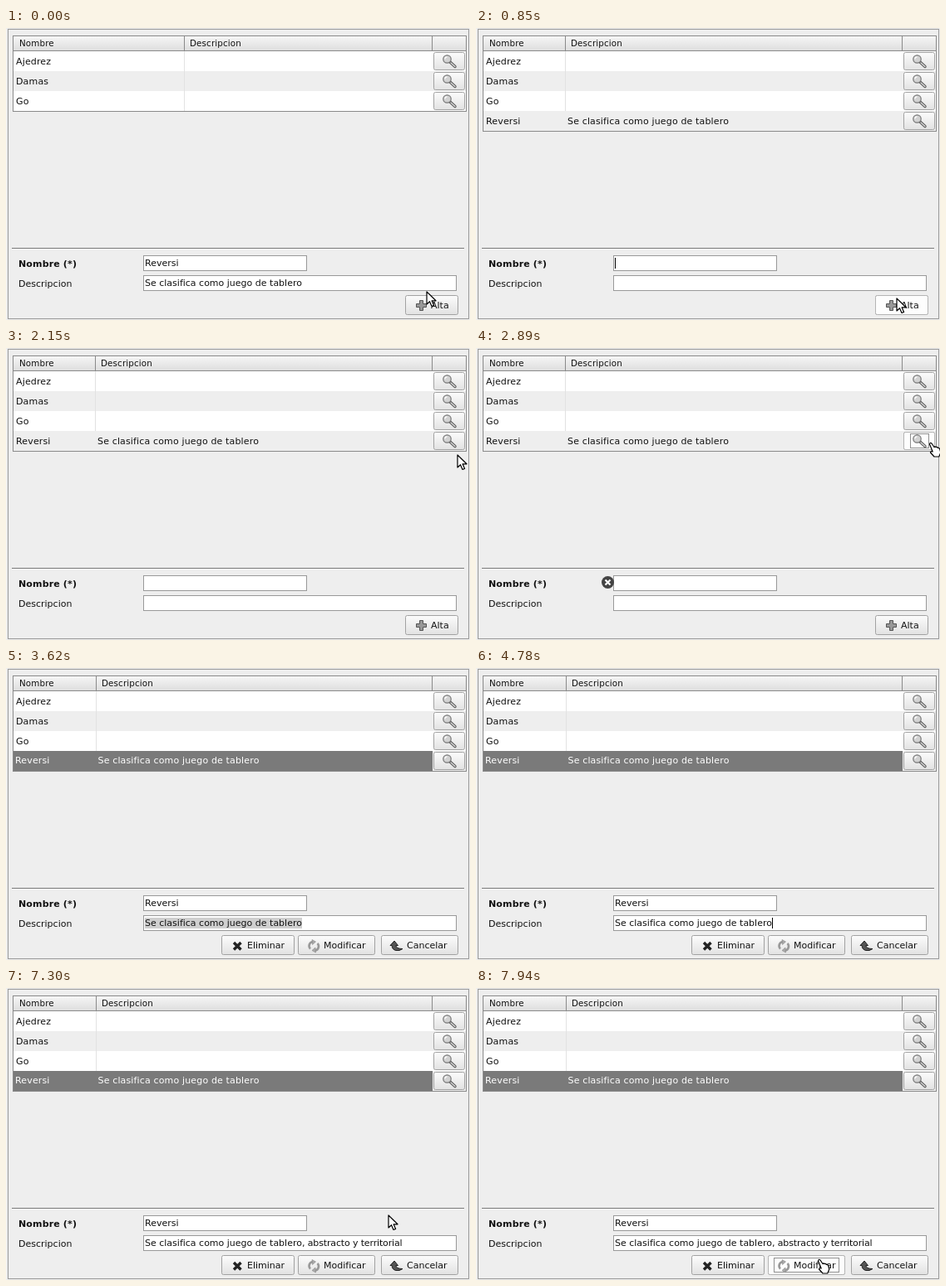
Write an HTML page that moves like this. It is 558 by 352 pixels and loops after 8000 ms.

```html
<!DOCTYPE html>
<html lang="es">
<head>
<meta charset="utf-8">
<title>Juegos</title>
<style>
html, body { margin: 0; width: 100%; height: 100%; overflow: hidden; background: #eee; }
svg { display: block; width: 558px; height: 352px; }
text { font: 11px "DejaVu Sans", sans-serif; fill: #111; }
.head text { font-size: 10.3px; letter-spacing: .15px; }
.cell text { letter-spacing: .15px; }
.picked text { fill: #fff; }
.bold { font-weight: bold; letter-spacing: .15px; }
.tail { letter-spacing: -.14px; }
.line { fill: none; stroke: #8a8a8a; }
.soft { stroke: #e2e2e2; }
.field { fill: #fff; stroke: #999; }
.btn { fill: url(#face); stroke: #a2a2a2; }
.hot { fill: #fdfdfd; stroke: #b4b4b4; }
.focus { fill: none; stroke: #222; stroke-dasharray: 1 1; }
.caret { fill: #000; }
.ptr { fill: #fff; stroke: #000; stroke-width: 1.2; stroke-linejoin: round; }
</style>
</head>
<body>
<!-- data-on lists the spans of time, in ms, in which a part is visible -->
<svg viewBox="0 0 558 352">
  <defs>
    <linearGradient id="face" x2="0" y2="1">
      <stop stop-color="#fcfcfc"/><stop offset="1" stop-color="#e2e2e2"/>
    </linearGradient>
    <linearGradient id="bar" x2="0" y2="1">
      <stop stop-color="#f6f6f6"/><stop offset="1" stop-color="#dedede"/>
    </linearGradient>
    <g id="glass">
      <path d="M534 41L540 46.500" stroke="#555" stroke-width="3.400" stroke-linecap="round"/>
      <path d="M535 42L540 46.500" stroke="#ddd" stroke-width="1.400" stroke-linecap="round"/>
      <circle cx="530.500" cy="37.500" r="4.700" fill="#d2d2d2" stroke="#777" stroke-width="1.200"/>
      <path d="M527.800 37.500a2.800 2.800 0 0 1 2.700-2.700" fill="none" stroke="#fff" stroke-width="1.200"/>
    </g>
    <g id="lens">
      <rect class="btn" x="514.500" y="29.500" width="37" height="21" rx="2"/>
      <use href="#glass"/>
    </g>
  </defs>

  <rect width="558" height="352" fill="#eee"/>
  <rect class="line" x="2.500" y="1.500" width="554" height="349" style="stroke:#999"/>

  <g class="cell">
    <rect x="9" y="28" width="544" height="72" fill="#fff"/>
    <rect x="9" y="52" width="544" height="24" fill="#eee"/>
    <text x="12" y="44">Ajedrez</text>
    <text x="12" y="68">Damas</text>
    <text x="12" y="92">Go</text>
    <g data-on="700-3300">
      <rect x="9" y="100" width="544" height="24" fill="#eee"/>
      <text x="12" y="116">Reversi</text>
      <text x="110" y="116">Se clasifica como juego de tablero</text>
    </g>
    <g class="picked" data-on="3300-8000">
      <rect x="9" y="100" width="544" height="24" fill="#eee"/>
      <rect x="9" y="100" width="504" height="24" fill="#7a7a7a"/>
      <text x="11" y="115">Reversi</text>
      <text x="110.500" y="115">Se clasifica como juego de tablero</text>
    </g>
  </g>

  <g class="head">
    <rect x="9" y="10" width="544" height="17" fill="url(#bar)"/>
    <path class="line" d="M9 27.500H553M512.500 10V27"/>
    <text x="16" y="22">Nombre</text>
    <g data-on="0-700">
      <path class="line" d="M214.500 10V27"/><path class="line soft" d="M214.500 28V100"/>
      <text x="221" y="22">Descripcion</text>
    </g>
    <g data-on="700-3300">
      <path class="line" d="M107.500 10V27"/><path class="line soft" d="M107.500 28V100"/>
      <text x="114" y="22">Descripcion</text>
    </g>
    <g data-on="3300-8000">
      <path class="line" d="M108.500 10V27"/><path class="line soft" d="M108.500 28V100"/>
      <text x="115" y="22">Descripcion</text>
    </g>
  </g>
  <rect class="line" x="8.500" y="9.500" width="545" height="91" data-on="0-700"/>
  <rect class="line" x="8.500" y="9.500" width="545" height="115" data-on="700-8000"/>

  <use href="#lens"/>
  <use href="#lens" y="24"/>
  <use href="#lens" y="48"/>
  <use href="#lens" y="72" data-on="700-8000"/>
  <g data-on="2190-3580">
    <rect class="hot" x="514.500" y="101.500" width="37" height="21" rx="2"/>
    <use href="#glass" y="72"/>
  </g>
  <rect class="focus" x="522.500" y="103.500" width="22" height="17" data-on="2710-3300"/>

  <path class="line" d="M7 265.500H551" style="stroke:#777"/>
  <path d="M7 266.500H551" stroke="#fafafa"/>
  <text class="bold" x="15" y="288">Nombre (*)</text>
  <text x="15" y="312">Descripcion</text>
  <rect class="field" x="165.500" y="274.500" width="196" height="18"/>
  <rect class="field" x="165.500" y="298.500" width="376" height="18"/>
  <rect x="167" y="301" width="189" height="13" fill="#cfcfcf" data-on="3620-4780"/>
  <g data-on="0-700 3300-8000">
    <text x="167" y="287">Reversi</text>
    <text x="167" y="311">Se clasifica como juego de tablero</text>
  </g>
  <text x="356" y="311" data-on="5380-6100">,</text>
  <text class="tail" x="356" y="311" data-on="6420-8000">, abstracto y territorial</text>

  <g class="caret">
    <rect x="207" y="277" width="1" height="13" data-on="40-560"/>
    <rect x="167" y="277" width="1" height="13" data-on="850-1590 3300-3580"/>
    <rect x="356" y="301" width="1" height="13" data-on="4780-5260 6100-6420"/>
    <rect x="359" y="301" width="1" height="13" data-on="5380-5860"/>
    <rect x="476" y="301" width="1" height="13" data-on="6420-6900"/>
  </g>

  <g data-on="2890-3300">
    <circle cx="158.500" cy="282.500" r="7.500" fill="#444"/>
    <path d="M155.500 279.500l6 6m0-6l-6 6" stroke="#fff" stroke-width="2.200"/>
  </g>

  <g data-on="0-3300">
    <rect class="btn" x="480.500" y="322.500" width="63" height="23" rx="2"/>
    <rect class="hot" x="480.500" y="322.500" width="63" height="23" rx="2" data-on="80-1630"/>
    <rect class="focus" x="487.500" y="325.500" width="49" height="17" data-on="560-700"/>
    <path d="M497.500 328.500h4v4h4v4h-4v4h-4v-4h-4v-4h4z" fill="#999" stroke="#555"/>
    <text x="511" y="338">Alta</text>
  </g>

  <g data-on="3300-8000">
    <rect class="btn" x="259.500" y="322.500" width="87" height="23" rx="2"/>
    <path d="M274 331l8.500 8.500m0-8.500l-8.500 8.500" stroke="#222" stroke-width="3.400"/>
    <text x="290" y="338">Eliminar</text>

    <rect class="btn" x="351.500" y="322.500" width="92" height="23" rx="2"/>
    <rect class="hot" x="351.500" y="322.500" width="92" height="23" rx="2" data-on="7420-8000"/>
    <rect class="focus" x="358.500" y="325.500" width="78" height="17" data-on="7740-8000"/>
    <g fill="none" stroke="#999" stroke-width="2.600">
      <path d="M366 338.500a5 5 0 0 1 3-8.500M374.500 332a5 5 0 0 1-3 8.500"/>
      <path d="M368 327.500l4.500 2.500-4 3.500zM372.500 343l-4.500-2.500 4-3.500z" fill="#aaa" stroke="#888" stroke-width=".6"/>
    </g>
    <text x="382" y="338">Modificar</text>

    <rect class="btn" x="451.500" y="322.500" width="92" height="23" rx="2"/>
    <path d="M462 334.500l5-5.500 4.500 5.500h-2.700q.5 4 8.200 4-4 3-8 2-5-1-4.800-6z" fill="#555" stroke="#222"/>
    <text x="482" y="338">Cancelar</text>
  </g>

  <g id="mouse" data-on="0-3580 7180-8000">
    <path class="ptr" d="M0 0V15L3.500 11.700 6 17.500 8.600 16.400 6.100 10.800H11Z"
      data-on="0-120 700-2190 7180-7420"/>
    <path class="ptr" d="M.5 2Q.8-.5 3 1L6 5.500Q7 4.500 8.200 5.500 9.800 5 10.400 6.400 12.300 6.200 12.800 8L13.800 12 11.800 17H6L1.500 12Q1.800 10 4.200 11Z"
      data-on="120-700 2190-3580 7420-8000"/>
  </g>
</svg>
<script>
const LOOP = 8000, TICK = 40;
const mouse = document.getElementById('mouse');

const parts = [...document.querySelectorAll('[data-on]')].map(el => ({
  el,
  spans: el.dataset.on.split(' ').map(s => s.split('-').map(Number))
}));

// start, end, from, bend, to
const legs = [
  [40, 120, [506, 318], [506, 322], [506, 326]],
  [1590, 2350, [506, 326], [530, 220], [545, 114]],
  [7180, 7460, [545, 151], [490, 250], [411, 327]]
];

function pointer(t) {
  const [start, end, a, b, c] = legs.findLast(leg => t >= leg[0]) || legs[0];
  const stepped = Math.floor((t - start) / TICK) * TICK;
  const u = Math.min(1, Math.max(0, stepped / (end - start)));
  const e = 1 - (1 - u) ** 2, r = 1 - e;
  return a.map((p, i) => Math.round(r * r * p + 2 * r * e * b[i] + e * e * c[i]));
}

function show(t) {
  for (const { el, spans } of parts) {
    el.style.display = spans.some(([from, to]) => t >= from && t < to) ? '' : 'none';
  }
  mouse.setAttribute('transform', `translate(${pointer(t)})`);
}

const begin = performance.now();
function tick() {
  show((performance.now() - begin) % LOOP);
  requestAnimationFrame(tick);
}
tick();
</script>
</body>
</html>
```
